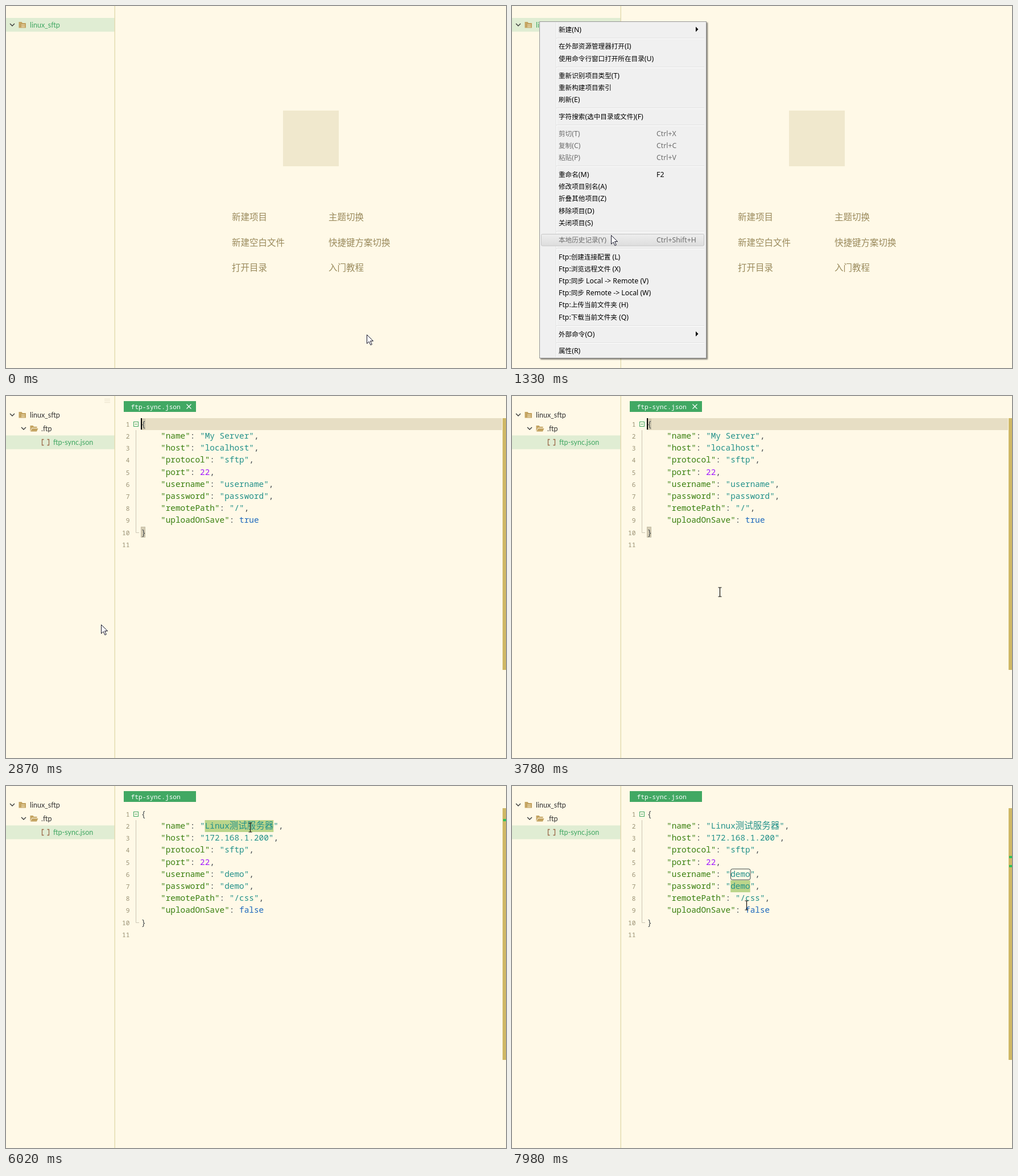
These frames come from a looping animation (879x637 px, 8000 ms). An HTML page:

```html
<!DOCTYPE html>
<html lang="zh">
<head>
<meta charset="utf-8">
<style>
  html, body { margin: 0; width: 100%; height: 100%; overflow: hidden; background: #fff9e7; }
  svg { display: block; }
  text { white-space: pre; }
  .tree { font: 12.5px Lato, sans-serif; fill: #333; }
  .tree .on { fill: #41a863; }
  .welcome { font: 300 15.5px "Noto Sans CJK SC", "Noto Sans CJK", sans-serif; fill: #9a8a5c; }
  .menu { font: 12.3px "Noto Sans", sans-serif; fill: #000; }
  .menu .off { fill: #6d6d6d; }
  .menu .han { font: 11.6px "Noto Sans CJK SC", "Noto Sans CJK", sans-serif; }
  .panel { filter: drop-shadow(2px 2px 1px rgba(0, 0, 0, .5)); }
  .code { font: 14.38px "Noto Sans Mono", monospace; fill: #4a4f52; }
  .code .han { font: 15.5px "Noto Sans CJK SC", "Noto Sans CJK", sans-serif; }
  .num { font-size: 11.2px; fill: #9b9274; text-anchor: end; }
  .tab { font-size: 11.2px; fill: #fff; }
  .key { fill: #387f0e; }
  .str { fill: #22918a; }
  .int { fill: #a31aff; }
  .bool { fill: #1d68bd; }
  .line { fill: none; }
</style>
</head>
<body>
<svg id="stage" width="879" height="637" viewBox="0 0 879 637"></svg>
<script>
const LOOP = 8000, STEP = 70;
const MENU_OPEN = 910, MENU_CLOSE = 1750, FOLDER_MADE = 2030, FILE_OPEN = 2450, EDITED = 4480, SAVED = 4760;
const ROW = 21.2, CHAR = 8.63, CODE_X = 237.5;

const rowTop = n => 39 + (n - 1) * ROW;
const han = s => s.replace(/[\u4e00-\u9fff]+/g, '<tspan class="han">$&</tspan>');
const text = (x, y, s, cls = '') => `<text x="${x}" y="${y}" class="${cls}">${s}</text>`;
const rect = (x, y, w, h, fill, more = '') =>
  `<rect x="${x}" y="${y}" width="${w}" height="${h}" fill="${fill}" ${more}/>`;
const line = (d, color, width = 1) =>
  `<path class="line" d="${d}" stroke="${color}" stroke-width="${width}"/>`;
const group = (id, body, cls = '') => `<g id="${id}" class="${cls}">${body}</g>`;

// Context menu: "-" is a separator, "!" disables an item, "|" splits off the shortcut, ">" has a submenu
const menuItems = [
  '新建(N)|>', '-', '在外部资源管理器打开(I)', '使用命令行窗口打开所在目录(U)', '-',
  '重新识别项目类型(T)', '重新构建项目索引', '刷新(E)', '-', '字符搜索(选中目录或文件)(F)', '-',
  '!剪切(T)|Ctrl+X', '!复制(C)|Ctrl+C', '!粘贴(P)|Ctrl+V', '-',
  '重命名(M)|F2', '修改项目别名(A)', '折叠其他项目(Z)', '移除项目(D)', '关闭项目(S)', '-',
  '!本地历史记录(Y)|Ctrl+Shift+H', '-',
  'Ftp:创建连接配置 (L)', 'Ftp:浏览远程文件 (X)', 'Ftp:同步 Local -&gt; Remote (V)',
  'Ftp:同步 Remote -&gt; Local (W)', 'Ftp:上传当前文件夹 (H)', 'Ftp:下载当前文件夹 (Q)', '-',
  '外部命令(O)|>', '-', '属性(R)'
];
const slots = [];

function menuMarkup() {
  let y = 41, rules = '', labels = '';
  for (const item of menuItems) {
    if (item === '-') {
      const s = Math.round(y - 6.4);
      rules += rect(78, s, 260, 1, '#e0e0e0') + rect(78, s + 1, 260, 1, '#fff');
      y += 8.7;
      continue;
    }
    const off = item[0] === '!';
    const [label, extra] = item.replace('!', '').split('|');
    const cls = off ? 'off' : '';
    labels += text(82, y + 4.5, han(label), cls);
    if (extra === '>') labels += `<path d="M323 ${y - 4.5}l4.5 4.5-4.5 4.5z"/>`;
    else if (extra) labels += text(254, y + 4.5, extra, cls);
    slots.push({ y, off });
    y += ROW;
  }
  return rect(48.5, 27.5, 293, 592, '#f0f0f0', 'class="panel" stroke="#979797"') +
    rect(77, 29, 1, 589, '#e2e3e3') + rect(78, 29, 1, 589, '#fff') + rules +
    rect(51.5, 0, 286, 20.5, 'url(#hot)', 'id="hover" rx="2"') + labels;
}

const paint = s => han(s.replace(/("[^"]*")(?=:)|("[^"]*")|(\d+)|(true|false)/g, (m, key, str, int) =>
  `<tspan class="${key ? 'key' : str ? 'str' : int ? 'int' : 'bool'}">${m}</tspan>`));

const config = (...v) => ['name', 'host', 'protocol', 'port', 'username', 'password', 'remotePath', 'uploadOnSave']
  .map((k, i) => {
    const value = typeof v[i] === 'string' ? `"${v[i]}"` : v[i];
    return text(CODE_X + 4 * CHAR, 75 + i * ROW, paint(`"${k}": ${value}${i < 7 ? ',' : ''}`));
  }).join('');

const before = config('My Server', 'localhost', 'sftp', 22, 'username', 'password', '/', true);
const after = config('Linux测试服务器', '172.168.1.200', 'sftp', 22, 'demo', 'demo', '/css', false);

const numbers = Array.from({ length: 11 }, (_, i) => text(217.5, 53.8 + i * ROW, i + 1, 'num')).join('');
const brace = y => rect(237.5, y, 7, 18, '#d5cdb4', 'stroke="#c3bca5"');
const folder = (x, y) => `<path d="M${x} ${y}h5l1.5 2h6v8.5h-12.5z" fill="#c4a462"/>`;
const chevron = (x, y) => line(`M${x} ${y}l4 4 4-4`, '#3a3a3a', 1.4);

const welcome = [['新建项目', '主题切换'], ['新建空白文件', '快捷键方案切换'], ['打开目录', '入门教程']]
  .map((pair, i) => pair.map((s, j) => text(397 + j * 170, 377 + i * 44.5, s)).join('')).join('');

const stage = document.getElementById('stage');
stage.innerHTML = `<defs>
    <linearGradient id="hot" x2="0" y2="1"><stop stop-color="#eaf1f9"/><stop offset="1" stop-color="#d9e7f6"/></linearGradient>
    <linearGradient id="cold" x2="0" y2="1"><stop stop-color="#eeeeee"/><stop offset="1" stop-color="#dddddd"/></linearGradient>
  </defs>` +
  rect(0, 0, 879, 637, '#fff9e7') +
  rect(0, 0, 190.7, 24.2, '#e0edd3', 'id="picked"') +
  rect(190.7, 0, 1, 637, '#d8cd98') +
  group('handle', line('M173 5.5h10M173 8.5h10M173 11.5h10', '#e9e2cc')) +
  group('tree',
    chevron(7, 31) + folder(22.5, 28) + line('M27 33.5h6M27 36.5h6', '#fff3d4') +
    text(42, 38, 'linux_sftp', 'on').replace('<text', '<text id="root"') +
    group('ftp', text(62, 62, '.ftp') +
      group('closed', line('M28 53l4 4-4 4', '#8a826c', 1.3) + folder(43, 52)) +
      group('opened', chevron(27, 55) +
        '<path d="M42.5 62v-10h5l1.5 2h5.5v2h-9zM46 57h10.5l-2.5 5.5h-11z" fill="#c4a462"/>' +
        line('M66.5 76.5h-3v10h3M72.5 76.5h3v10h-3', '#9c6a4a', 1.3) +
        text(83, 86, 'ftp-sync.json', 'on'))), 'tree') +
  group('welcome', rect(487, 184, 98, 98, '#f0e8cd') + welcome, 'welcome') +
  group('editor',
    rect(207, 9, 127, 19, '#41a863') + text(219.5, 23, 'ftp-sync.json', 'tab') +
    group('close', line('M317.5 14.5l8 8m0-8l-8 8', '#fff', 1.1)) +
    rect(237, 0, 635, 21, '#e7dec4', 'id="current"') + rect(0, 0, 0, 21, '#bbd58b', 'id="selection"') +
    group('match', brace(40.5) + brace(230.5)) + numbers +
    rect(224.5, 45.5, 8, 8, 'none', 'stroke="#41a863"') + line('M226.5 49.5h4', '#41a863') +
    line('M228.5 60V240.5H234', '#cbc6b4') +
    text(CODE_X, 53.8, '{') + text(CODE_X, 53.8 + 9 * ROW, '}') +
    group('before', before) + group('after', after) +
    rect(384.5, 146, 34.5, 19, 'none', 'id="twin" rx="3" stroke="#3c4a4a"') +
    rect(237, 39, 2, 20, '#000', 'id="caret"') +
    rect(873, 39, 6, 443, '#cfb866') + group('marks', ''), 'code') +
  group('menu', menuMarkup(), 'menu') +
  group('arrow', '<path d="M.5.5V16l3.7-3.5 2.7 6 2.4-1-2.7-6h5z" fill="#fff" stroke="#16162a"/>') +
  group('beam', line('M-3-8h2.5q.5 0 .5 1V7q0 1-.5 1H-3M3-8H.5Q0-8 0-7M0 7q0 1 .5 1H3', '#111', 1.2));

const $ = id => document.getElementById(id);
const show = (id, on) => $(id).style.display = on ? '' : 'none';
const set = (id, attrs) => { for (const k in attrs) $(id).setAttribute(k, attrs[k]); };

// time, x, y
const path = [
  [0, 634, 578], [660, 37, 33], [840, 47, 27], [980, 48, 28], [1330, 174, 403], [1540, 174, 444],
  [2520, 174, 444], [2730, 138, 410], [3360, 365, 345], [3800, 365, 345], [4200, 742, 588],
  [4270, 743, 590], [4340, 759, 605], [4690, 759, 605], [4800, 757, 620], [5040, 475, 168],
  [5300, 430, 72], [6000, 430, 72], [6160, 398, 92], [6720, 398, 92], [7000, 402, 163],
  [7140, 402, 177], [7560, 402, 177], [7980, 412, 210]
];

// time, highlighted row, selection [x, row, width], marked rows
const phases = [
  [0, 1, null, []],
  [EDITED, 0, null, [3]],
  [5320, 2, null, []],
  [5670, 0, [349.6, 2, 120.7], [2]],
  [6160, 3, null, []],
  [6440, 0, [384.2, 3, 25.9], [3]],
  [7140, 7, null, []],
  [7280, 0, [384.2, 7, 34.5], [6, 7]]
];

function pointer(t) {
  const i = path.findIndex(p => p[0] > t);
  if (i < 0) return path[path.length - 1].slice(1);
  const [a, b] = [path[i - 1], path[i]];
  const u = (t - a[0]) / (b[0] - a[0]), e = u * u * (3 - 2 * u);
  return [1, 2].map(k => Math.round(a[k] + (b[k] - a[k]) * e));
}

function draw(t) {
  const [x, y] = pointer(t);
  const menu = t >= MENU_OPEN && t < MENU_CLOSE, open = t >= FILE_OPEN;
  const beam = open && x > 191;

  show('handle', x < 191 && !menu);
  set('picked', { y: open ? 69.4 : 21 });
  set('root', { class: open ? '' : 'on' });
  show('ftp', t >= FOLDER_MADE);
  show('closed', !open);
  show('opened', open);
  show('welcome', !open);
  show('editor', open);

  show('menu', menu);
  const slot = slots.find(s => Math.abs(s.y - y) < 10.6);
  show('hover', slot && x > 50);
  if (slot) set('hover', {
    y: Math.round(slot.y - 10.5) + .5,
    fill: slot.off ? 'url(#cold)' : 'url(#hot)',
    stroke: slot.off ? '#c6c6c6' : '#aecff7'
  });

  const [, row, pick, marks] = phases.filter(p => p[0] <= t).pop();
  show('before', t < EDITED);
  show('after', t >= EDITED);
  show('close', t < SAVED);
  show('match', row === 1);
  show('caret', row === 1 && (t - FILE_OPEN) % 1060 < 530);
  show('current', row);
  set('current', { y: Math.round(rowTop(row)) });
  show('selection', pick);
  if (pick) set('selection', { x: pick[0], y: Math.round(rowTop(pick[1])), width: pick[2] });
  show('twin', marks.length > 1);
  $('marks').innerHTML = marks.map(n => rect(874, Math.round(74.5 + (n - 3) * 16.2), 5, 4, '#2fc25b')).join('');

  show('arrow', !beam);
  show('beam', beam);
  set('arrow', { transform: `translate(${x} ${y})` });
  set('beam', { transform: `translate(${x + .5} ${y})` });
}

const start = performance.now();
function tick() {
  const t = (performance.now() - start) % LOOP;
  draw(Math.floor(t / STEP) * STEP);
  requestAnimationFrame(tick);
}
tick();
</script>
</body>
</html>
```
